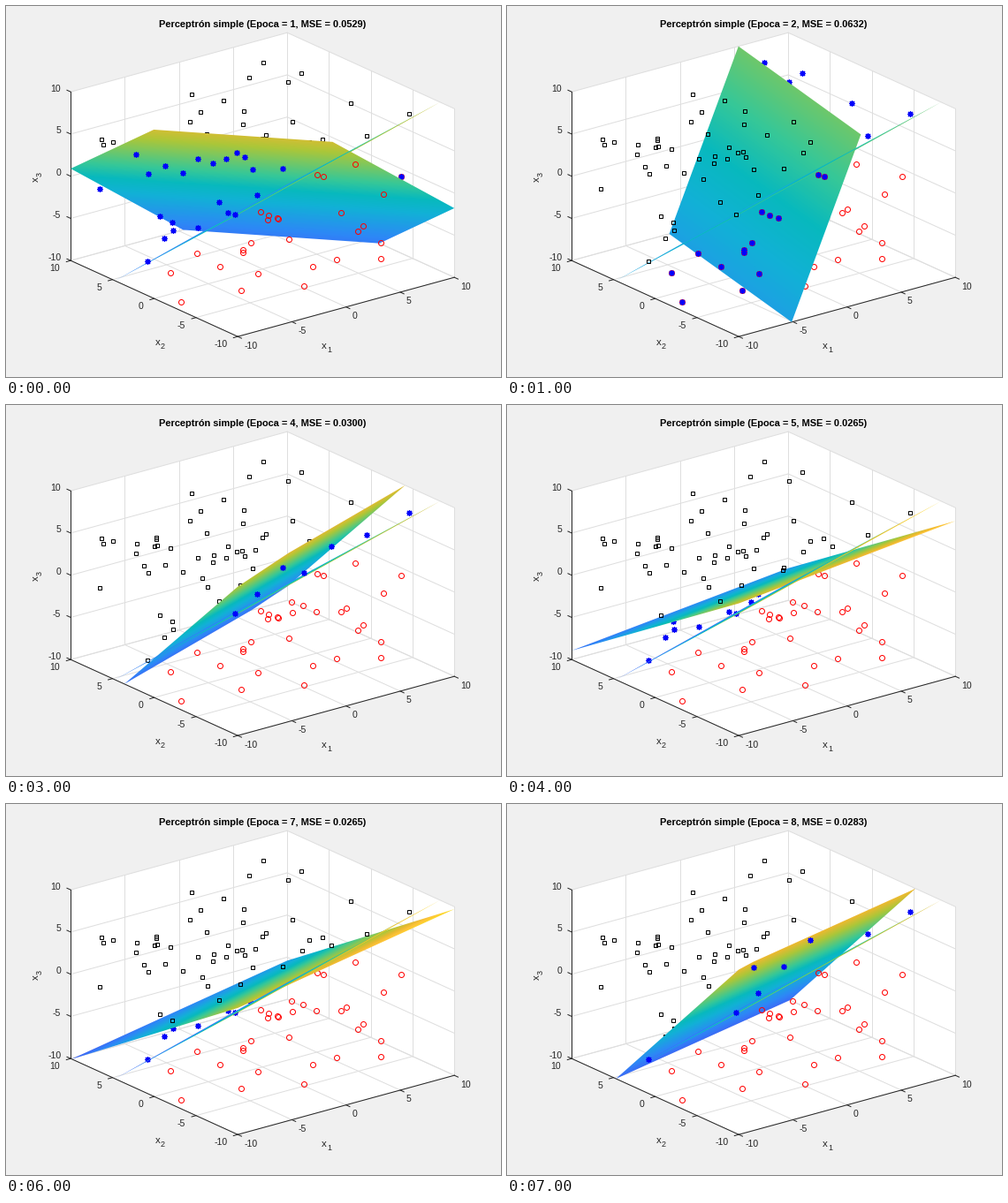
Write a matplotlib script that moves like this. It is 560x420 px and loops after 8 s.

```python
import itertools

import numpy as np
import matplotlib.pyplot as plt
from matplotlib.animation import FuncAnimation
from matplotlib.colors import LinearSegmentedColormap
from matplotlib.path import Path

W, H = 560, 420
PX = 0.72  # points per pixel at 100 dpi
INK = (0.15, 0.15, 0.15)
R = 10  # half the side of the box
COUNT = 97

# Planes are (a, b, c) in z = a*x + b*y + c
GOAL = (0.361, -0.983, -1.77)
EPOCHS = [
    ("0.0529", (-1.05, -0.915, -0.45)),
    ("0.0632", (3.13, -0.645, -0.45)),
    ("0.0316", (-0.288, -0.803, -0.15)),
    ("0.0300", (0.5, -1.3, -0.35)),
    ("0.0265", (0.1375, -0.73, -0.26)),
    ("0.0283", (0.4, -1.3, -0.35)),
    ("0.0265", (0.235, -0.755, -0.2)),
    ("0.0283", (0.339, -1.33, -0.36)),
]

# Orthographic view: screen = ORIGIN + VIEW @ (x, y, z)
ORIGIN = np.array([290.2, 202.2])
VIEW = np.array([[12.25, -9.45, 0], [-3.35, -4.3, -9.55]])
TO_VIEWER = np.cross(VIEW[1], VIEW[0])

parula = LinearSegmentedColormap.from_list("parula", [
    (0, (0.242, 0.150, 0.660)), (1 / 7, (0.281, 0.323, 0.958)),
    (2 / 7, (0.179, 0.529, 0.968)), (3 / 7, (0.069, 0.695, 0.839)),
    (0.5, (0.03, 0.725, 0.745)), (4 / 7, (0.216, 0.784, 0.592)),
    (5 / 7, (0.672, 0.779, 0.223)), (0.8, (0.910, 0.728, 0.190)),
    (6 / 7, (0.997, 0.766, 0.220)), (1, (0.977, 0.984, 0.081)),
])

plt.rcParams["font.family"] = "Liberation Sans"
fig = plt.figure(figsize=(5.6, 4.2), dpi=100, facecolor="#f0f0f0")
ax = fig.add_axes([0, 0, 1, 1])


def project(points):
    return ORIGIN + np.asarray(points) @ VIEW.T


def height(plane, x, y):
    a, b, c = plane
    return a * x + b * y + c


def above(points, plane):
    x, y, z = points.T
    return z > height(plane, x, y)


def faces_up(plane):
    a, b, _ = plane
    up = np.array([-a, -b, 1])
    return up @ TO_VIEWER * np.sign(TO_VIEWER[2]) > 0


def clip(points, sign):
    """Cut off the part of a 3D polygon where sign * z exceeds R."""
    out = []
    for p, q in zip(points, points[1:] + points[:1]):
        dp, dq = R - sign * p[2], R - sign * q[2]
        if dp >= 0:
            out.append(p)
        if dp * dq < 0:
            out.append(p + (q - p) * dp / (dp - dq))
    return out


def outline(plane):
    corners = [(-R, R), (R, R), (R, -R), (-R, -R)]
    poly = [np.array([x, y, height(plane, x, y)]) for x, y in corners]
    poly = clip(clip(poly, 1), -1)
    return Path(project(poly + poly[:1]), closed=True)


def height_map(plane):
    """Height of the plane seen at each pixel."""
    a, b, c = plane
    u, v = np.meshgrid(np.arange(W) + 0.5, np.arange(H) + 0.5)
    flat = VIEW[:, :2] + np.outer(VIEW[:, 2], (a, b))
    screen = np.stack([u.ravel(), v.ravel()], axis=1) - ORIGIN - VIEW[:, 2] * c
    x, y = np.linalg.solve(flat, screen.T)
    return np.clip(height(plane, x, y), -R, R).reshape(H, W)


def color_range(plane):
    corners = itertools.product((plane, GOAL), (-R, R), (-R, R))
    z = [height(*corner) for corner in corners]
    return min(z), max(z)


def segment(p, q, color, z):
    ax.plot(*project([p, q]).T, color=color, lw=PX, zorder=z)


def label(pos, text, size=10.5, ha="center", color=INK, **kw):
    return ax.text(*pos, text, fontsize=size * PX, color=color, ha=ha,
                   va="center", **kw)


def draw_box():
    rim = [(-R, R, R), (R, R, R), (R, -R, R), (R, -R, -R), (-R, -R, -R), (-R, R, -R)]
    ax.fill(*project(rim).T, color="white", lw=0, zorder=0)
    # Each axis: its edge, the outward tick, the label offset and alignment
    edges = [
        (lambda t: (t, -R, -R), (0, -0.45, 0), (7, 10.5), "left"),
        (lambda t: (-R, t, -R), (-0.4, 0, 0), (-12, 9), "right"),
        (lambda t: (-R, R, t), (0, 0.45, 0), (-11, -3.5), "right"),
    ]
    for edge, tick, offset, ha in edges:
        segment(edge(-R), edge(R), INK, 1.2)
        for t in range(-R, R + 1, 5):
            p = np.array(edge(t))
            segment(p, p + tick, INK, 1.2)
            label(project(p) + offset, str(t), ha=ha)

    # Grid on the floor and the two back walls
    back = np.array([R, R, -R])
    for fixed, along in itertools.permutations(range(3), 2):
        for t in range(-R, R + 1, 5):
            p, q = back.copy(), back.copy()
            p[fixed] = q[fixed] = t
            p[along], q[along] = -R, R
            segment(p, q, "#dedede", 1)

    names = [((360, 384.5), (5.5, 4.5), 0), ((172, 380.5), (5.5, 4.5), 0),
             ((33.5, 196), (4.5, -5.5), 90)]
    for i, (pos, shift, angle) in enumerate(names, 1):
        label(pos, "x", 11.5, rotation=angle)
        label(np.add(pos, shift), str(i), 9, rotation=angle)


def surface(z):
    return ax.imshow(np.zeros((H, W)), extent=(0, W, H, 0), cmap=parula,
                     interpolation="nearest", aspect="auto", zorder=z)


def show_plane(image, plane):
    image.set_data(height_map(plane))
    image.set_clip_path(outline(plane), transform=ax.transData)


def markers(shape, size, color, width, z):
    return ax.plot([], [], ls="none", marker=shape, ms=size * PX, mfc="none",
                   mec=color, mew=width * PX, zorder=z)[0]


def marker_layer(z):
    return [markers("s", 5, "black", 1, z), markers("o", 6, "red", 1, z),
            markers((8, 2, 0), 7, "blue", 1.2, z + 0.1)]


draw_box()
title = label((290, 21), "", 11, color="black", weight="bold")
sheet, sliver = surface(3), surface(3.5)
show_plane(sliver, GOAL)
behind, front = marker_layer(2), marker_layer(4)

samples = np.random.default_rng(7).uniform(-R, R, (COUNT, 3))
spots = project(samples)
positive = above(samples, GOAL)

ax.set_xlim(0, W)
ax.set_ylim(H, 0)
ax.axis("off")


def draw(i):
    error, plane = EPOCHS[i]
    title.set_text(f"Perceptrón simple (Epoca = {i + 1}, MSE = {error})")
    show_plane(sheet, plane)
    for image in (sheet, sliver):
        image.set_clim(*color_range(plane))

    guess = above(samples, plane)
    nearer = guess == faces_up(plane)
    for layer, inside in ((behind, ~nearer), (front, nearer)):
        for art, group in zip(layer, (positive, ~positive, guess != positive)):
            art.set_data(*spots[inside & group].T)
    return []


anim = FuncAnimation(fig, draw, frames=len(EPOCHS), interval=1000,
                     repeat=True, repeat_delay=0, blit=False)
plt.show()
```
